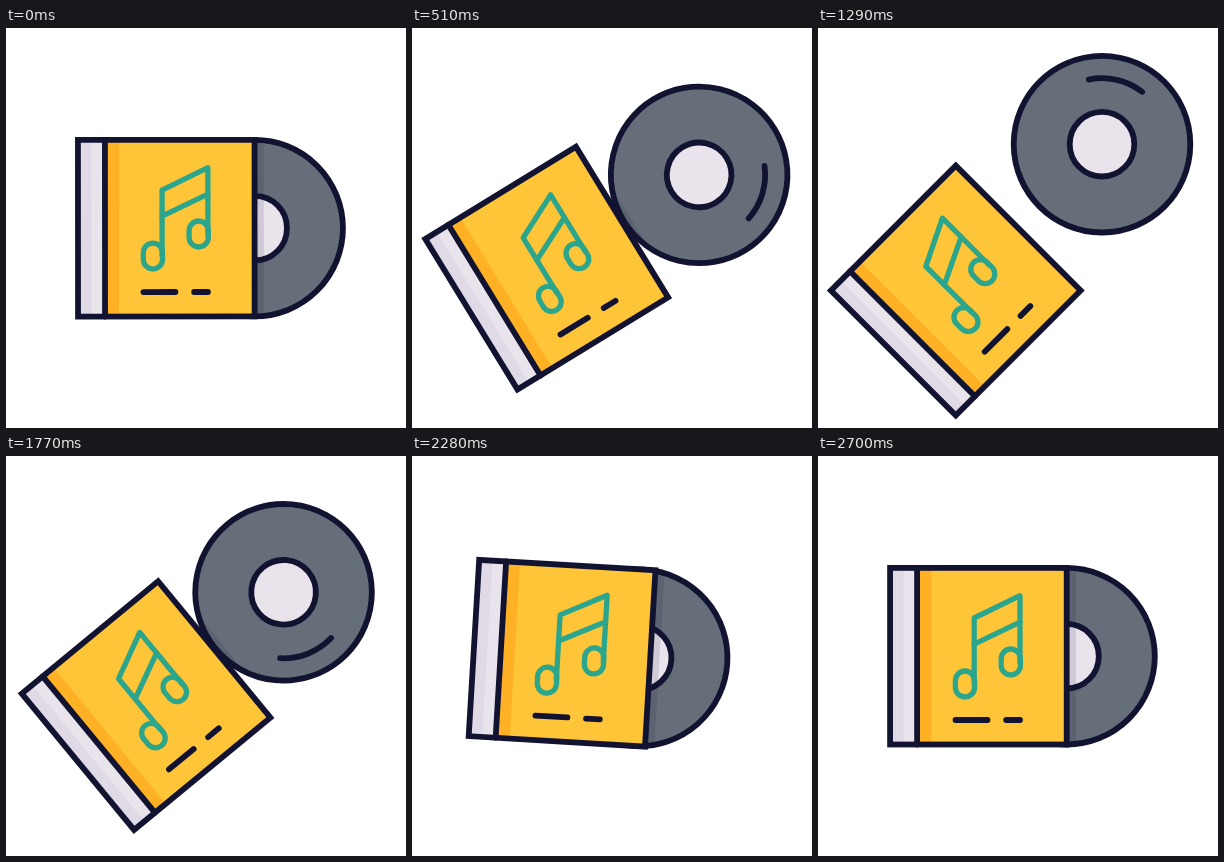
These frames come from a looping animation (400x400 px, 2730 ms). An HTML page with a canvas:

```html
<!DOCTYPE html>
<html lang="en">
<head>
<meta charset="utf-8">
<style>
  html, body { margin: 0; width: 100%; height: 100%; overflow: hidden; background: #fff; }
  canvas { display: block; }
</style>
</head>
<body>
<canvas id="stage" width="400" height="400"></canvas>
<script>
const ctx = document.getElementById('stage').getContext('2d');
const LOOP = 2730, OPEN = 1340, SHUT = 2280, SETTLED = 2700;
const DEG = Math.PI / 180;
const INK = '#121231', GREY = '#656e79', PALE = '#e9e4ec', TEAL = '#2ca58d';
const HALF = 88.3, SPINE = 27, LINE = 5.8;

const mix = (a, b, x) => a + (b - a) * x;
const smooth = x => x * x * (3 - 2 * x);
const easeOut = x => 1 - (1 - x) ** 3;

// Glide open, swing back past rest, then settle. The lags delay each ease.
function swing(t, { rest, open, past, openLag = 1, shutLag }) {
  if (t < OPEN) return mix(rest, open, easeOut((t / OPEN) ** openLag));
  if (t < SHUT) return mix(open, past, smooth(((t - OPEN) / (SHUT - OPEN)) ** shutLag));
  return mix(past, rest, smooth(Math.min(1, (t - SHUT) / (SETTLED - SHUT))));
}

const tilt = { rest: 0, open: -45, past: 3.4, openLag: 1.15, shutLag: 2 };
const caseShift = { rest: -39.6, open: -88, past: -50, shutLag: 1.37 };
const discShift = { rest: 48.5, open: 118.8, past: 27.2, shutLag: 1.6 };
const spin = t => 149.5 + 441 * Math.sin((t - 900) / 1272);

function line(color, ...points) {
  ctx.beginPath();
  points.forEach(([x, y]) => ctx.lineTo(x, y));
  ctx.strokeStyle = color;
  ctx.stroke();
}

function panel(color, x, width) {
  ctx.fillStyle = color;
  ctx.fillRect(x, -HALF, width, 2 * HALF);
}

function disk(radius, fill) {
  ctx.beginPath();
  ctx.arc(0, 0, radius, 0, 2 * Math.PI);
  ctx.fillStyle = fill;
  ctx.fill();
  ctx.stroke();
}

function noteHead(x, y) {
  ctx.beginPath();
  ctx.roundRect(x - 9.6, y - 13, 19.2, 26, 9.6);
  ctx.stroke();
}

function drawDisc(angle, caseX) {
  ctx.lineWidth = LINE;
  ctx.strokeStyle = INK;
  disk(HALF, GREY);
  disk(32.3, PALE);
  ctx.beginPath();
  ctx.arc(0, 0, 66, (angle - 24.5) * DEG, (angle + 24.5) * DEG);
  ctx.stroke();

  // Shadow cast by the case, kept inside the disc
  ctx.save();
  ctx.beginPath();
  ctx.arc(0, 0, HALF, 0, 2 * Math.PI);
  ctx.clip();
  panel('rgba(18, 18, 50, .12)', caseX + HALF, 9.2);
  ctx.restore();
}

function drawCase() {
  const fold = SPINE - HALF;
  panel('#ffc539', -HALF, 2 * HALF);
  panel('#ffb125', fold, 14);
  panel(PALE, -HALF, SPINE);
  panel('#e0dae7', -HALF, SPINE / 2);
  ctx.lineWidth = LINE;
  ctx.strokeStyle = INK;
  ctx.strokeRect(-HALF, -HALF, 2 * HALF, 2 * HALF);
  line(INK, [fold, -HALF], [fold, HALF]);
  line(INK, [-22.9, 63.8], [9.1, 63.8]);
  line(INK, [27.8, 63.8], [41.6, 63.8]);

  ctx.lineWidth = 5.3;
  ctx.lineJoin = 'round';
  line(TEAL, [-4.2, 27], [-4.2, -38.2], [41.6, -60.5], [41.6, 6]);
  line(TEAL, [-4.2, -12], [41.6, -34]);
  noteHead(-13.4, 27.8);
  noteHead(32.4, 5.8);
}

function draw(t) {
  const angle = swing(t, tilt);
  const discX = swing(t, discShift);
  const caseX = swing(t, caseShift) - discX;
  ctx.clearRect(0, 0, 400, 400);
  ctx.save();
  ctx.lineCap = 'round';
  ctx.translate(200, 200.2);
  ctx.rotate(angle * DEG);
  ctx.translate(discX, 0);
  drawDisc(spin(t) - angle, caseX);
  ctx.translate(caseX, 0);
  drawCase();
  ctx.restore();
}

const start = performance.now();
function tick() {
  draw((performance.now() - start) % LOOP);
  requestAnimationFrame(tick);
}
tick();
</script>
</body>
</html>
```
